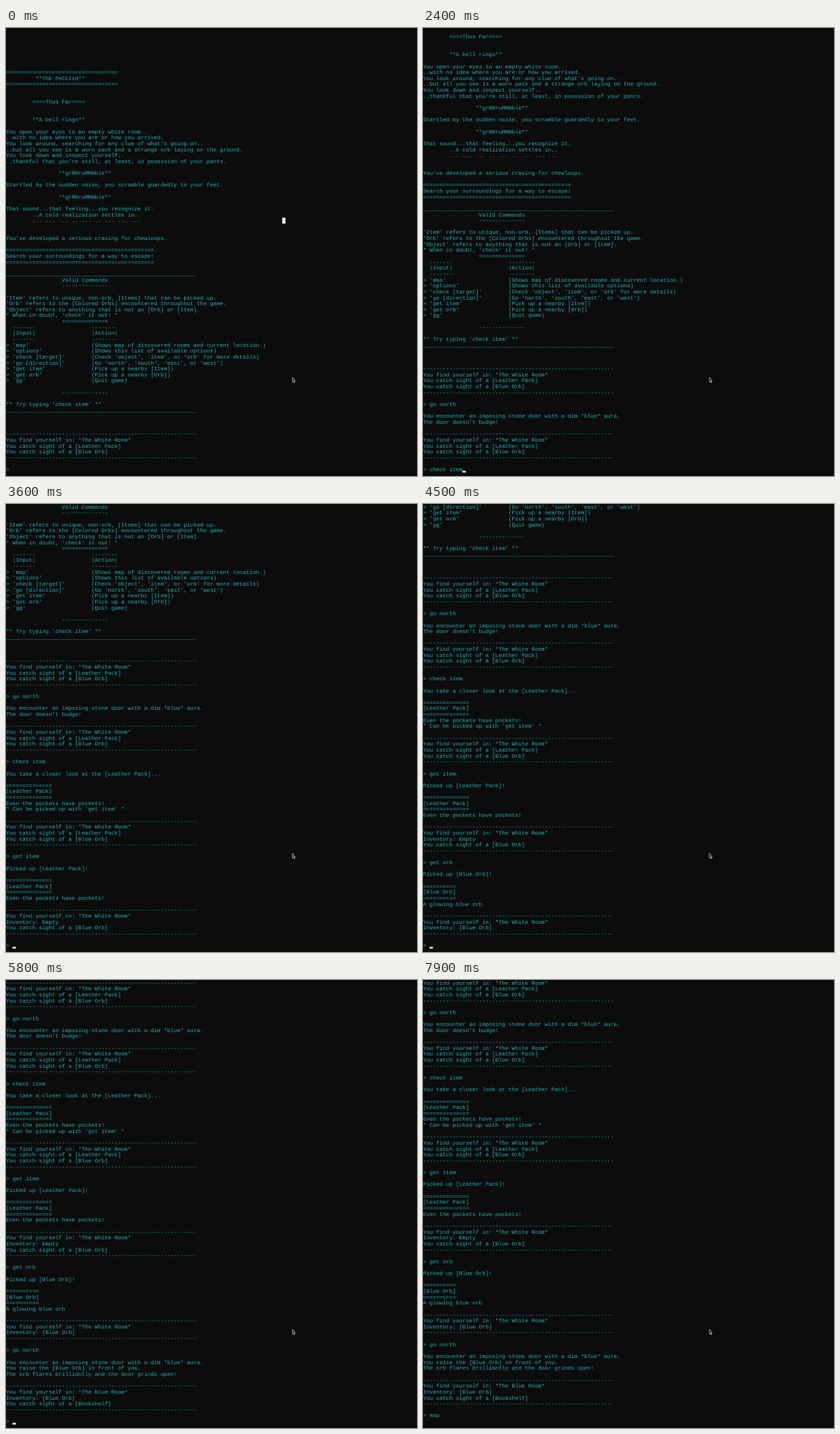
These frames come from a looping animation (600 by 653 pixels, 8 s). An HTML page:

```html
<!DOCTYPE html>
<html lang="en">
<head>
<meta charset="utf-8">
<title>Text adventure</title>
<style>
html, body { margin: 0; width: 100%; height: 100%; overflow: hidden; background: #0c0c0c; }
svg { display: block; }
text { font: 8px "Liberation Mono", "Courier New", monospace; fill: #1fb2b8; white-space: pre; text-rendering: geometricPrecision; }
</style>
</head>
<body>
<svg id="stage" width="600" height="653" viewBox="0 0 600 653">
  <rect width="600" height="653" fill="#0c0c0c"/>
  <g id="rows"></g>
  <rect id="block" x="403.2" y="276.5" width="4.8" height="8.6" fill="#f2f2f2"/>
  <rect id="caret" y="645.4" width="4.8" height="2.6" fill="#f2f2f2"/>
  <path d="M418.2 509.2V516L419.6 514.8L420.5 517L421.5 516.6L420.6 514.4H422.2Z" fill="#0c0c0c" stroke="#e6e6e6" stroke-width=".7"/>
</svg>
<script>
const LOOP = 8000, CELL_W = 4.8, CELL_H = 8.64, LAST = 74, BASE = 6.7;
const $ = id => document.getElementById(id);

const at = (col, s) => ' '.repeat(col) + s;
const dash = '-'.repeat(58), under = '_'.repeat(58);
const eq = n => '='.repeat(n);
const pair = (a, b) => a.padEnd(26) + b;
const status = (room, ...lines) => [dash, `You find yourself in: *The ${room} Room*`, ...lines, dash, ''];
const card = (name, ...lines) => [eq(name.length), name, eq(name.length), ...lines, ''];
const sight = name => `You catch sight of a [${name}]`;
const pack = sight('Leather Pack'), orb = sight('Blue Orb');
const held = 'Inventory: [Blue Orb]';
const door = 'You encounter an imposing stone door with a dim *blue* aura.';

const intro = [
  eq(34), at(9, '**ThE PeCkIsH**'), eq(34), '', '',
  at(8, '====Thus Far===='), '', '',
  at(8, '**A bell rings**'), '',
  'You open your eyes to an empty white room..',
  '..with no idea where you are or how you arrived.',
  "You look around, searching for any clue of what's going on..",
  '..but all you see is a worn pack and a strange orb laying on the ground.',
  'You look down and inspect yourself..',
  "..thankful that you're still, at least, in posession of your pants.", '',
  at(16, '**grRRruMMmble**'), '',
  'Startled by the sudden noise, you scramble guardedly to your feet.', '',
  at(16, '**grRRruMMmble**'), '',
  'That sound...that feeling...you recognize it.',
  at(8, '..A cold realization settles in..'),
  at(8, '... ... ... .. ... .. ... ... ...'), '', '',
  "You've developed a serious craving for chewloops.", '',
  eq(45), 'Search your surroundings for a way to escape!', eq(45), '',
  under, at(17, 'Valid Commands'), at(17, '-'.repeat(14)), '',
  "'Item' refers to unique, non-orb, [Items] that can be picked up.",
  "'Orb' refers to the [Colored Orbs] encountered throughout the game.",
  "'Object' refers to anything that is not an [Orb] or [Item].",
  "* When in doubt, 'check' it out! *",
  at(17, eq(14)),
  pair('  -------', '--------'),
  pair('  |Input|', '|Action|'),
  pair('  -------', '--------'),
  pair("> 'map'", '(Shows map of discovered rooms and current location.)'),
  pair("> 'options'", '(Shows this list of available options)'),
  pair("> 'check [target]'", "(Check 'object', 'item', or 'orb' for more details)"),
  pair("> 'go [direction]'", "(Go 'north', 'south', 'east', or 'west')"),
  pair("> 'get item'", '(Pick up a nearby [Item])'),
  pair("> 'get orb'", '(Pick up a nearby [Orb])'),
  pair("> 'gg'", '(Quit game)'), '',
  at(17, '-'.repeat(14)), '',
  "** Try typing 'check item' **", under, '', '', '',
  ...status('White', pack, orb)
];

// keys: one time per character, or the start of an even 100 ms rhythm
const turns = [
  { cmd: 'go north', keys: [200, 300, 500, 600, 700, 900, 1000, 1000], enter: 1100,
    out: ['', door, "The door doesn't budge!", '', ...status('White', pack, orb)] },
  { cmd: 'check item', keys: 1400, enter: 2500,
    out: ['', 'You take a closer look at the [Leather Pack]...', '',
      ...card('[Leather Pack]', 'Even the pockets have pockets!', "* Can be picked up with 'get item' *"),
      ...status('White', pack, orb)] },
  { cmd: 'get item', keys: 2700, enter: 3600,
    out: ['', 'Picked up [Leather Pack]!', '',
      ...card('[Leather Pack]', 'Even the pockets have pockets!'),
      ...status('White', 'Inventory: Empty', orb)] },
  { cmd: 'get orb', keys: 3700, enter: 4500,
    out: ['', 'Picked up [Blue Orb]!', '',
      ...card('[Blue Orb]', 'A glowing blue orb'),
      ...status('White', held)] },
  { cmd: 'go north', keys: 4900, enter: 5800,
    out: ['', door, 'You raise the [Blue Orb] in front of you.',
      'The orb flares brilliantly and the door grinds open!', '',
      ...status('Blue', held, sight('Bookshelf'))] },
  { cmd: 'map', keys: [6300, 6500, 6800], enter: 7100, out: [] }
];

const rows = Array.from({ length: LAST + 1 }, (_, i) => {
  const el = document.createElementNS('http://www.w3.org/2000/svg', 'text');
  el.setAttribute('x', 0);
  el.setAttribute('y', (i * CELL_H + BASE).toFixed(2));
  return $('rows').appendChild(el);
});

const typed = ({ cmd, keys }, t) =>
  [...cmd].filter((_, i) => t >= (Array.isArray(keys) ? keys[i] : keys + i * 100)).join('');

function render(t) {
  const log = [...intro];
  let prompt = '';
  for (const turn of turns) {
    if (t < turn.enter) {
      prompt = '> ' + typed(turn, t);
      break;
    }
    log.push('> ' + turn.cmd, ...turn.out);
  }
  log.push(prompt);
  const top = log.length - 1 - LAST;
  rows.forEach((el, i) => {
    const line = log[top + i] || '';
    if (el.textContent !== line) el.textContent = line;
  });
  $('block').style.display = t < 200 ? '' : 'none';
  $('caret').style.display = t >= 200 && prompt ? '' : 'none';
  $('caret').setAttribute('x', prompt.length * CELL_W);
}

const start = performance.now();
function tick() {
  render((performance.now() - start) % LOOP);
  requestAnimationFrame(tick);
}
tick();
</script>
</body>
</html>
```
